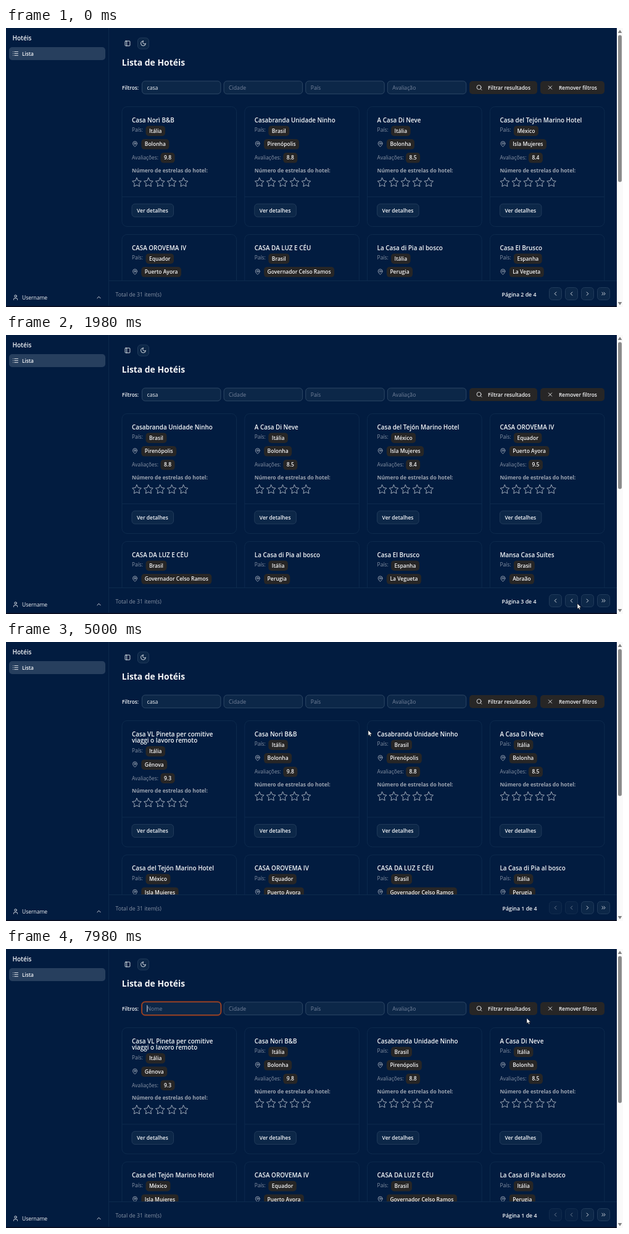
Recreate the animation shown at these times as an HTML page. Size 1000x452 px, loop 8 s.

```html
<!DOCTYPE html>
<html lang="pt">
<head>
<meta charset="utf-8">
<title>Lista de Hotéis</title>
<style>
html, body { margin: 0; width: 100%; height: 100%; overflow: hidden; background: #021c40; }
svg { display: block; width: 100vw; height: 100vh; }
text { font-family: "Open Sans", "Noto Sans", sans-serif; white-space: pre; }
.icon { fill: none; stroke-linecap: round; stroke-linejoin: round; }
</style>
</head>
<body>
<svg id="stage" viewBox="0 0 1000 452">
  <g id="page"></g>
  <g id="pointer"></g>
</svg>
<script>
const LOOP = 8000;
const BG = '#021c40', LINE = '#0d2a4d', PANEL = '#0c2748', EDGE = '#213b5b', DARK = '#272626';
const WHITE = '#f5f6f8', MUTED = '#8792a4';

// title, country, city, rating
const HOTELS = [
  ['Casa VL Pineta per comitive|viaggi o lavoro remoto', 'Itália', 'Gênova', '9.3'],
  ['Casa Norì B&amp;B', 'Itália', 'Bolonha', '9.8'],
  ['Casabranda Unidade Ninho', 'Brasil', 'Pirenópolis', '8.8'],
  ['A Casa Di Neve', 'Itália', 'Bolonha', '8.5'],
  ['Casa del Tejón Marino Hotel', 'México', 'Isla Mujeres', '8.4'],
  ['CASA OROVEMA IV', 'Equador', 'Puerto Ayora', '9.5'],
  ['CASA DA LUZ E CÉU', 'Brasil', 'Governador Celso Ramos', '9.0'],
  ['La Casa di Pia al bosco', 'Itália', 'Perugia', '9.0'],
  ['Casa El Brusco', 'Espanha', 'La Vegueta', '9.0'],
  ['Mansa Casa Suítes', 'Brasil', 'Abraão', '9.0']
];

// 24 unit outlines
const ICON = {
  list: 'M3 5h.01M3 12h.01M3 19h.01M8 5h13M8 12h13M8 19h13',
  panel: 'M5 3h14a2 2 0 0 1 2 2v14a2 2 0 0 1-2 2H5a2 2 0 0 1-2-2V5a2 2 0 0 1 2-2zM9 3v18',
  moon: 'M12 3a6 6 0 0 0 9 9 9 9 0 1 1-9-9z',
  search: 'M19 11a8 8 0 1 1-16 0 8 8 0 0 1 16 0zM21 21l-4.3-4.3',
  cross: 'M18 6L6 18M6 6l12 12',
  user: 'M19 21v-2a4 4 0 0 0-4-4H9a4 4 0 0 0-4 4v2M16 7a4 4 0 1 1-8 0 4 4 0 0 1 8 0z',
  up: 'M18 15l-6-6-6 6',
  left: 'M15 18l-6-6 6-6',
  right: 'M9 18l6-6-6-6',
  last: 'M6 17l5-5-5-5M13 17l5-5-5-5',
  pin: 'M20 10c0 6-8 12-8 12s-8-6-8-12a8 8 0 0 1 16 0zM15 10a3 3 0 1 1-6 0 3 3 0 0 1 6 0z',
  star: 'M12 2l3.1 6.3 6.9 1-5 4.8 1.2 6.9-6.2-3.2L5.8 21 7 14.1 2 9.3l6.9-1z'
};
const PAGER = [[890.5, 'left'], [916.5, 'left'], [942.5, 'right'], [968.5, 'last']];
const ctx = document.createElement('canvas').getContext('2d');

function textWidth(s, size, weight) {
  ctx.font = `${weight} ${size}px "Open Sans", "Noto Sans", sans-serif`;
  return ctx.measureText(s).width;
}
const text = (x, y, s, size = 8.5, weight = 400, fill = WHITE) =>
  `<text x="${x}" y="${y}" font-size="${size}" font-weight="${weight}" fill="${fill}">${s}</text>`;
const box = (x, y, w, h, fill, stroke = 'none', r = 5) =>
  `<rect x="${x}" y="${y}" width="${w}" height="${h}" rx="${r}" fill="${fill}" stroke="${stroke}"/>`;
const line = (x1, y1, x2, y2, color = LINE) => `<path d="M${x1} ${y1}L${x2} ${y2}" stroke="${color}"/>`;
const icon = (name, cx, cy, size = 10.4, color = WHITE, weight = 2) =>
  `<path class="icon" d="${ICON[name]}" stroke="${color}" stroke-width="${weight}"
    transform="translate(${cx - size / 2} ${cy - size / 2}) scale(${size / 24})"/>`;
const badge = (x, cy, s) =>
  box(x, cy - 8.3, textWidth(s, 8.5, 600) + 11, 16.6, DARK) + text(x + 5.5, cy + 3.1, s, 8.5, 600);

function card([title, country, city, rating], x, y, extra) {
  const lines = title.split('|'), d = (lines.length - 1) * 10.4, tx = x + 16, bottom = y + extra;
  let out = box(x, y, 185.5, 194 + extra, 'none', LINE, 8);
  lines.forEach((s, i) => out += text(tx, y + 25.3 + i * 10.4, s, 9.9, 600));
  out += text(tx, y + 40.6 + d, 'País:', 8.4, 400, MUTED) + badge(x + 38.5, y + 39.2 + d, country);
  out += icon('pin', x + 21, y + 60.5 + d, 10.4, '#a9b1be') + badge(x + 31.3, y + 60.8 + d, city);
  out += text(tx, y + 85.8 + d, 'Avaliações:', 8.4, 400, MUTED) + badge(x + 62.5, y + 82.8 + d, rating);
  out += text(tx, y + 106 + d, 'Número de estrelas do hotel:', 8.5, 700, '#9ba3b0');
  for (let i = 0; i < 5; i++) out += icon('star', x + 24 + i * 18.9, y + 122.6 + d, 17.5, '#b4bcc8', 1.25);
  out += line(x, bottom + 146, x + 185.5, bottom + 146);
  out += box(tx, bottom + 157.5, 67.5, 21, PANEL, EDGE) + text(x + 24, bottom + 171.1, 'Ver detalhes', 8.45, 600);
  return out;
}

function sidebar() {
  return line(166.5, 0, 166.5, 450) + text(10.5, 19.7, 'Hotéis', 10, 600) +
    box(5, 31, 156, 21, '#273f5e') + icon('list', 15.5, 41.5) + text(26, 45.3, 'Lista', 8.3, 600) +
    icon('user', 15.5, 436.5) + text(26, 440.2, 'Username') + icon('up', 150.5, 436.5);
}

function filters(value, focus) {
  let out = text(188, 99.7, 'Filtros:', 8.3, 600);
  ['Nome', 'Cidade', 'País', 'Avaliação'].forEach((label, i) => {
    const x = 220.5 + i * 132.6, typed = i ? '' : value, active = !i && focus > 0;
    if (active) out += `<g opacity="${focus}">${box(x - 1, 85, 129.5, 22.8, '#a8431d', '#8a3518', 6)}</g>`;
    out += box(x, 86, 127.5, 20.8, PANEL, active ? '#a34a2c' : '#2d4765');
    out += text(x + 8, 99.6, typed || label, 8.7, 400, typed ? WHITE : '#74829a');
    if (active) {
      const cx = x + 8.3 + textWidth(typed, 8.7, 400);
      out += line(cx, 91, cx, 102, '#c3cad4');
    }
  });
  return out + box(751, 86, 110, 21, DARK) + icon('search', 767, 96.5) + text(781, 99.6, 'Filtrar resultados', 8.4, 600) +
    box(866, 86, 104, 21, DARK) + icon('cross', 882, 96.5) + text(896, 99.6, 'Remover filtros', 8.4, 600);
}

function footer(page, hover) {
  let out = `<path d="M167 409.5H990V452H167z" fill="${BG}"/>` + line(167, 409.5, 990, 409.5) +
    text(177.5, 434.6, 'Total de 31 item(s)', 8.74, 400, MUTED) +
    text(page === 1 ? 804.5 : 803.5, 434.6, `Página ${page} de 4`, 8.8, 600);
  PAGER.forEach(([cx, name], i) => {
    out += `<g opacity="${page === 1 && i < 2 ? .5 : 1}">` +
      box(cx - 10, 420.5, 20, 20, hover === i ? '#1d3655' : PANEL, EDGE) + icon(name, cx, 430.5) + '</g>';
  });
  return out;
}

function scrollbar() {
  return '<path d="M990 0h10v452h-10z" fill="#fafafa"/>' + box(992, 11.5, 6, 238, '#8b8b8b', 'none', 3) +
    '<path d="M995 3l3.3 5h-6.6zM995 449l3.3-5h-6.6z" fill="#7f7f7f"/>';
}

function drawPage({ page, value, focus, hover }) {
  const extra = page === 1 ? 10.4 : 0;
  let cards = '';
  for (let i = 0; i < 8; i++) {
    const row = i >> 2;
    cards += card(HOTELS[page - 1 + i], 188 + (i % 4) * 198.8, 127.5 + row * (207 + extra), row ? 0 : extra);
  }
  return `<path d="M0 0h1000v452H0z" fill="${BG}"/>` + cards + sidebar() +
    icon('panel', 197, 25) + box(213.5, 16, 18, 18, PANEL, EDGE) + icon('moon', 222.5, 25) +
    text(187.8, 61, 'Lista de Hotéis', 13.9, 700) + filters(value, focus) + footer(page, hover) +
    '<path d="M0 450.5h990v1.5H0z" fill="#0b0b1c"/>' + scrollbar();
}

// Latest entry whose start time has passed
const at = (steps, t) => steps.filter(s => s[0] <= t).pop()[1];
const PAGES = [[0, 2], [1450, 3], [2200, 2], [2730, 1], [3420, 2], [4300, 1]];
const VALUES = [[0, 'casa'], [6700, 'cas'], [6770, 'ca'], [6840, '']];
const PATH = [
  [700, 932, 456], [780, 929, 444], [830, 936, 438], [1030, 941, 436], [1760, 941, 436],
  [1820, 926, 435], [2010, 926, 435], [2200, 917, 436], [3250, 917, 436], [3400, 940, 436],
  [3710, 940, 436], [4000, 892, 434], [4660, 892, 434], [5000, 587, 143], [5100, 587, 143],
  [5390, 234, 109], [6060, 234, 109], [6250, 231, 97], [7570, 250, 99], [7980, 844, 112]
];

function pointerAt(t) {
  if (t < 700 || t > 6250 && t < 7570) return null;
  const i = PATH.findIndex(p => p[0] > t);
  if (i < 0) return PATH[PATH.length - 1].slice(1);
  const [a, b] = [PATH[i - 1], PATH[i]], k = (t - a[0]) / (b[0] - a[0]);
  return [a[1] + (b[1] - a[1]) * k, a[2] + (b[2] - a[2]) * k];
}

const ARROW = 'M0 0v8.7l2-1.8 1.3 3 1.5-.7-1.3-2.9h2.7z';
const HAND = 'M-.9 .8Q0-.5 .9 .8V4l4.1 1Q6 5.4 5.7 6.8L5 10.5H-.5L-3.2 6.7Q-3 5.2-.9 6.5z';

const pageLayer = document.getElementById('page'), pointerLayer = document.getElementById('pointer');
let shown = '';

function render(t) {
  const pos = pointerAt(t), page = at(PAGES, t);
  let hover = pos && pos[1] > 420 && pos[1] < 441 ? PAGER.findIndex(([cx]) => Math.abs(pos[0] - cx) < 9.4) : -1;
  if (page === 1 && hover < 2) hover = -1;
  // The border lights at once, the ring follows
  const focus = t < 6460 ? 0 : Math.min(1, Math.max(.02, (t - 6520) / 40));
  const state = { page, value: at(VALUES, t), focus, hover }, key = JSON.stringify(state);
  if (key !== shown) {
    pageLayer.innerHTML = drawPage(state);
    shown = key;
  }
  pointerLayer.innerHTML = pos ? `<path d="${hover < 0 ? ARROW : HAND}" transform="translate(${pos[0]} ${pos[1]})"
    fill="#fff" stroke="#111" stroke-width=".6" stroke-linejoin="round"/>` : '';
}

const start = performance.now();
function tick() {
  render((performance.now() - start) % LOOP);
  requestAnimationFrame(tick);
}
tick();
</script>
</body>
</html>
```
